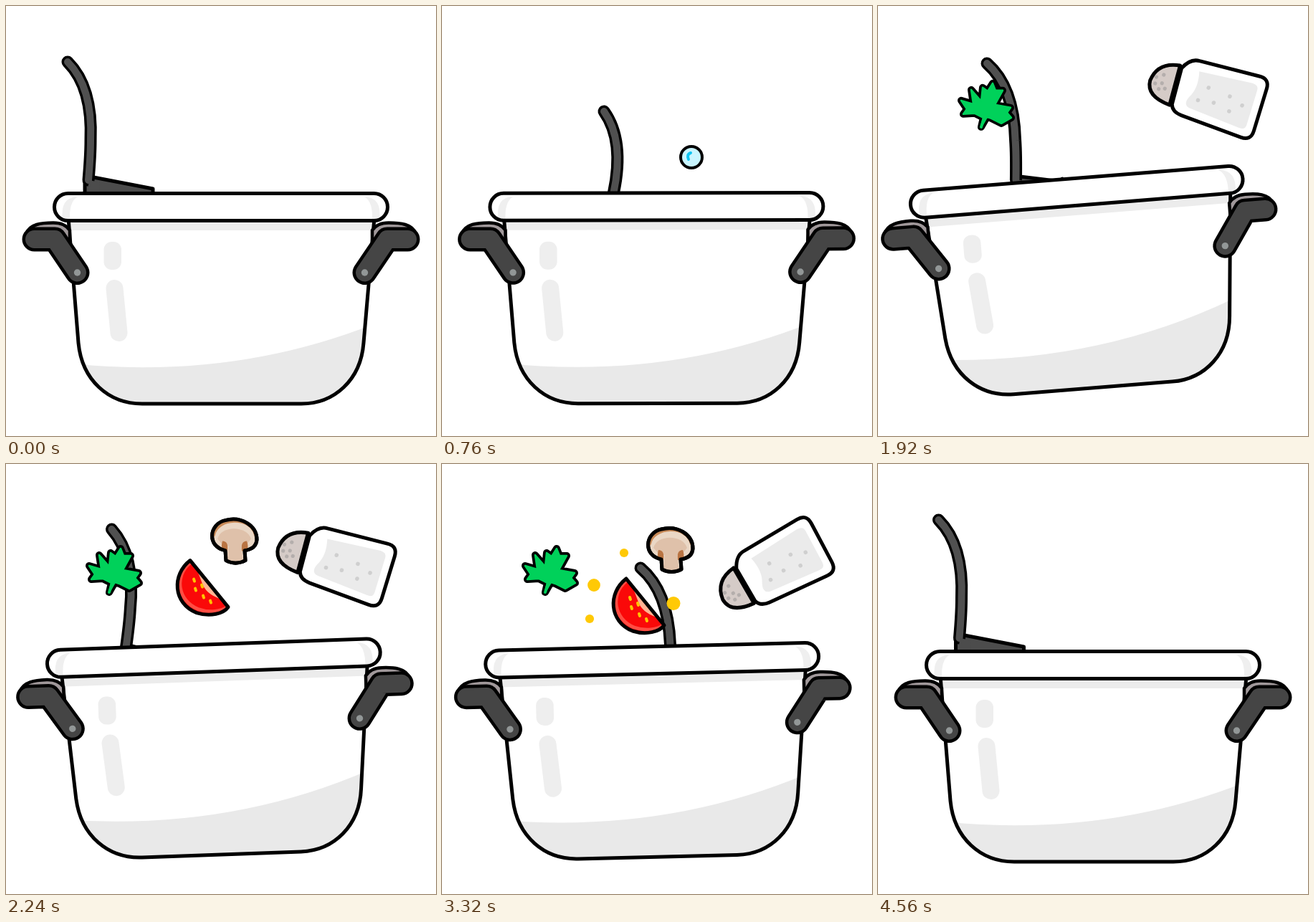
Write an HTML page with a canvas that moves like this. It is 600 px wide and 600 px high and loops after 5000 ms.

```html
<!DOCTYPE html>
<html lang="en">
<head>
<meta charset="utf-8">
<title>Cooking pot</title>
<style>
html, body { margin: 0; width: 100%; height: 100%; overflow: hidden; background: #fff; }
canvas { display: block; width: 600px; height: 600px; }
</style>
</head>
<body>
<canvas id="stage" width="600" height="600"></canvas>
<script>
const ctx = document.getElementById('stage').getContext('2d');
const LOOP = 5000, STEP = 40, LAST = 4560;
const TAU = Math.PI * 2, RAD = Math.PI / 180;
ctx.lineCap = ctx.lineJoin = 'round';

const clamp = v => Math.max(0, Math.min(1, v));
const progress = (t, start, length) => clamp((t - start) / length);
const smooth = u => u * u * (3 - 2 * u);
const backIn = (u, s) => u * u * ((s + 1) * u - s);
const backOut = (u, s) => 1 - backIn(1 - u, s);

function shape(path, fill, width, color = '#000') {
  const p = path instanceof Path2D ? path : new Path2D(path);
  if (fill) { ctx.fillStyle = fill; ctx.fill(p); }
  if (width) { ctx.lineWidth = width; ctx.strokeStyle = color; ctx.stroke(p); }
}
function circle(x, y, r, fill, width) {
  const p = new Path2D();
  p.arc(x, y, r, 0, TAU);
  shape(p, fill, width);
}
function roundBox(x, y, w, h, r, fill, width) {
  const p = new Path2D();
  p.roundRect(x, y, w, h, r);
  shape(p, fill, width);
}
function placed(x, y, angle, draw) {
  ctx.save();
  ctx.translate(x, y);
  ctx.rotate(angle * RAD);
  draw();
  ctx.restore();
}

// Smooth curve through keys of the form [time, ...values].
function follow(keys, t) {
  let i = 0;
  while (i < keys.length - 2 && t > keys[i + 1][0]) i++;
  const a = keys[i], b = keys[i + 1], span = b[0] - a[0], u = clamp((t - a[0]) / span);
  const slope = (k, c) => k > 0 && k < keys.length - 1
    ? (keys[k + 1][c] - keys[k - 1][c]) / (keys[k + 1][0] - keys[k - 1][0]) : 0;
  return a.slice(1).map((v, n) => {
    const c = n + 1, w = 1 - u;
    return v * w * w * (1 + 2 * u) + b[c] * u * u * (3 - 2 * u)
      + span * u * w * (slope(i, c) * w - slope(i + 1, c) * u);
  });
}

// --- Pot ---
const bodyPath = new Path2D('M87 296L101 470C106 522 143 555 190 555H412C458 555 495 522 499 470L514 296Z');

function handle() {
  shape('M28 318C33 304 50 302.5 66 302.5Q82 302.5 89 313V330H30Z', '#a0989a', 4.5);
  const arm = 'M39.5 325.5H68L99.5 372';
  shape(arm, null, 34);
  shape(arm, null, 25, '#454545');
  circle(99.5, 372, 4.7, '#929797');
}
function mirrored(draw) {
  draw();
  ctx.save();
  ctx.translate(600, 0);
  ctx.scale(-1, 1);
  draw();
  ctx.restore();
}
function pot(tilt) {
  placed(22, 557, -tilt, () => {
    ctx.translate(-22, -557);
    shape(bodyPath, '#fff');
    ctx.save();
    ctx.clip(bodyPath);
    shape('M80 498Q315 524 520 441V570H80Z', '#e9e9e9');
    ctx.fillStyle = '#ececec';
    ctx.fillRect(80, 298, 440, 15);
    ctx.restore();
    roundBox(136.5, 329, 24.5, 39, 11, '#eee');
    shape('M151.5 394L157.5 456', null, 24, '#eee');
    shape(bodyPath, null, 5);
    mirrored(handle);
    roundBox(67.5, 261.5, 465, 38, 19, '#fff');
    mirrored(() => shape('M79 298Q75 267 100 266Q88 273 89 298Z', '#efefef'));
    roundBox(67.5, 261.5, 465, 38, 19, null, 5);
  });
}
function potTilt(t) {
  return 5 * [[370, 370], [2000, 430], [3600, 430]].reduce((sum, [peak, half]) =>
    sum + smooth(clamp(1 - Math.abs(t - peak) / (t > peak ? 430 : half))), 0);
}

// --- Spatula: x, y of the handle tip and the lean ---
const spoonKeys = [
  [0, 86, 78, 0], [760, 226, 147, 9.5], [1920, 152, 80, -4], [2680, 167, 122, 14],
  [3320, 277, 145, -5], [3880, 262, 88, -9.5], [4560, 84.5, 78, 0]
];
function spoon(t) {
  const [x, y, lean] = follow(spoonKeys, t);
  placed(x, y, lean, () => {
    const grip = 'M0 0C25 25 34 65 32 110Q32 130 29 165';
    const blade = 'M31 160L119 177V187L24 196L24 170Z';
    shape(blade, '#4c4c4c', 5);
    shape(grip, null, 17);
    shape(grip, null, 10, '#505050');
    shape('M30 165L45 168L44 184H27Z', '#4c4c4c');
  });
}

// --- Ingredients, drawn where they hover ---
function bubble() {
  circle(0, 0, 15, '#c9f5ff', 4);
  shape('M-1 -6Q-7 -4 -4 3', null, 4, '#10c5f2');
}
function leaf() {
  const p = new Path2D('M147 166L135 160L119 161L124 154L116 142L133 147L130 127L144 143' +
    'L146 124L153 129L160 118L164 128L174 128L163 148L185 152L180 159L186 166L172 174L158 167L152 165L144 179Z');
  shape(p, null, 10);
  shape(p, '#00d15a', 2.5, '#00d15a');
  shape('M148 166L144 179', null, 4, '#00d15a');
}
function tomato(t) {
  const p = new Path2D('M257 160C231 180 233 220 266 233C285 239 304 234 310 225Z');
  const outline = 5 - 3.5 * progress(t, 3500, 380);
  shape(p, '#fa0909');
  ctx.save();
  ctx.clip(p);
  shape('M256 164C235 182 239 216 268 228C285 234 300 231 309 225', null, 5, '#ff4d43');
  shape('M267 174L300 214Q278 207 273 190Z', '#ffb493');
  ctx.restore();
  shape(p, null, outline);
  for (const [x, y] of [[262, 186], [264, 199], [275, 209], [285, 216], [273, 194]])
    shape(`M${x} ${y}l1 3`, null, 4, '#ffc400');
}
function mushroom() {
  const p = new Path2D('M306 133C280 128 283 96 306 91C328 85 350 98 350 118Q349 131 333 133L334 147Q320 154 307 147Z');
  shape(p, '#ead7c5', 5);
  ctx.save();
  ctx.clip(p);
  shape('M289 111C294 86 342 83 349 111', null, 6, '#c88a58');
  shape('M295 117C300 98 336 98 342 117L334 127H304Z', '#dfc1aa');
  shape('M302 120Q311 120 309 134Q298 134 302 120ZM336 120Q327 120 329 134Q341 134 336 120Z', '#b97443');
  shape('M312 120H327L331 149H308Z', '#dfc1aa');
  ctx.restore();
  shape(p, null, 5);
}
function shaker() {
  shape('M-68 -26Q-99 -22 -102 6Q-101 29 -66 31Z', '#d5cbc7', 5);
  for (const [x, y] of [[-95, -1], [-86, -7], [-94, 8], [-85, 5], [-87, 14], [-79, 11]])
    circle(x, y, 2.6, '#b4aeac');
  shape('M-65 -23Q-57 -40 -44 -40L42 -44Q57 -45 57 -30V31Q57 46 42 45L-46 40Q-60 39 -63 29Z', '#fff', 5);
  shape('M-40 -26L36 -32Q45 -32 45 -24V26Q45 34 36 33L-38 27Q-49 25 -43 12Q-34 -3 -40 -26Z', '#ebebeb');
  for (const [x, y] of [[-21, -8], [-30, 13], [-8, 10], [11, -5], [16, 15], [31, 2]])
    circle(x, y, 2.8, '#cfcfcf');
}

// Springs out of the pot at `rise` and dives back at `dive`.
function offset(t, item) {
  const { rise, riseTime = 800, riseBack = 2.6, dive, diveTime = 700, diveBack = 2.3 } = item;
  if (t < rise || t >= dive + diveTime) return null;
  return 1 - backOut(progress(t, rise, riseTime), riseBack) + backIn(progress(t, dive, diveTime), diveBack);
}
const items = [
  { draw: leaf, depth: 150, rise: 1270, dive: 3330, diveTime: 540 },
  { draw: tomato, depth: 130, rise: 1860, dive: 3355 },
  { draw: mushroom, depth: 185, rise: 1900, riseTime: 750, riseBack: 1.7, dive: 3720 },
  {
    draw: t => placed(479, 141 - 5 * smooth(progress(t, 2720, 500)),
      17 - 45 * smooth(progress(t, 2720, 500)) - 4 * smooth(progress(t, 3400, 480)), shaker),
    depth: 195, side: -90, rise: 1270, dive: 3800, diveTime: 650, diveBack: 1.2
  }
];
function drawItem(item, t) {
  const o = offset(t, item);
  if (o === null) return;
  ctx.save();
  ctx.translate((item.side || 0) * Math.max(0, o), item.depth * o);
  item.draw(t);
  ctx.restore();
}

function corn(t) {
  [[254, 124, 6.1], [212, 169, 8.9], [206, 216, 6.1], [323, 194.5, 9.5]].forEach(([x, y, r], i) => {
    const out = 3940 - i * 30;
    ctx.globalAlpha = progress(t, 2280 + i * 40, 160) * (1 - progress(t, out, 120));
    circle(x, y, r, '#ffc905');
  });
  ctx.globalAlpha = 1;
}

function render(t) {
  ctx.fillStyle = '#fff';
  ctx.fillRect(0, 0, 600, 600);
  spoon(t);
  if (t > 680 && t < 1310) placed(348, 104 + 107 * ((t - 1000) / 240) ** 2, 0, bubble);
  items.forEach(item => drawItem(item, t));
  corn(t);
  pot(potTilt(t));
}

const start = performance.now();
function tick(now) {
  const t = Math.max(0, now - start) % LOOP;
  render(Math.min(LAST, Math.floor(t / STEP) * STEP));
  requestAnimationFrame(tick);
}
render(0);
requestAnimationFrame(tick);
</script>
</body>
</html>
```
